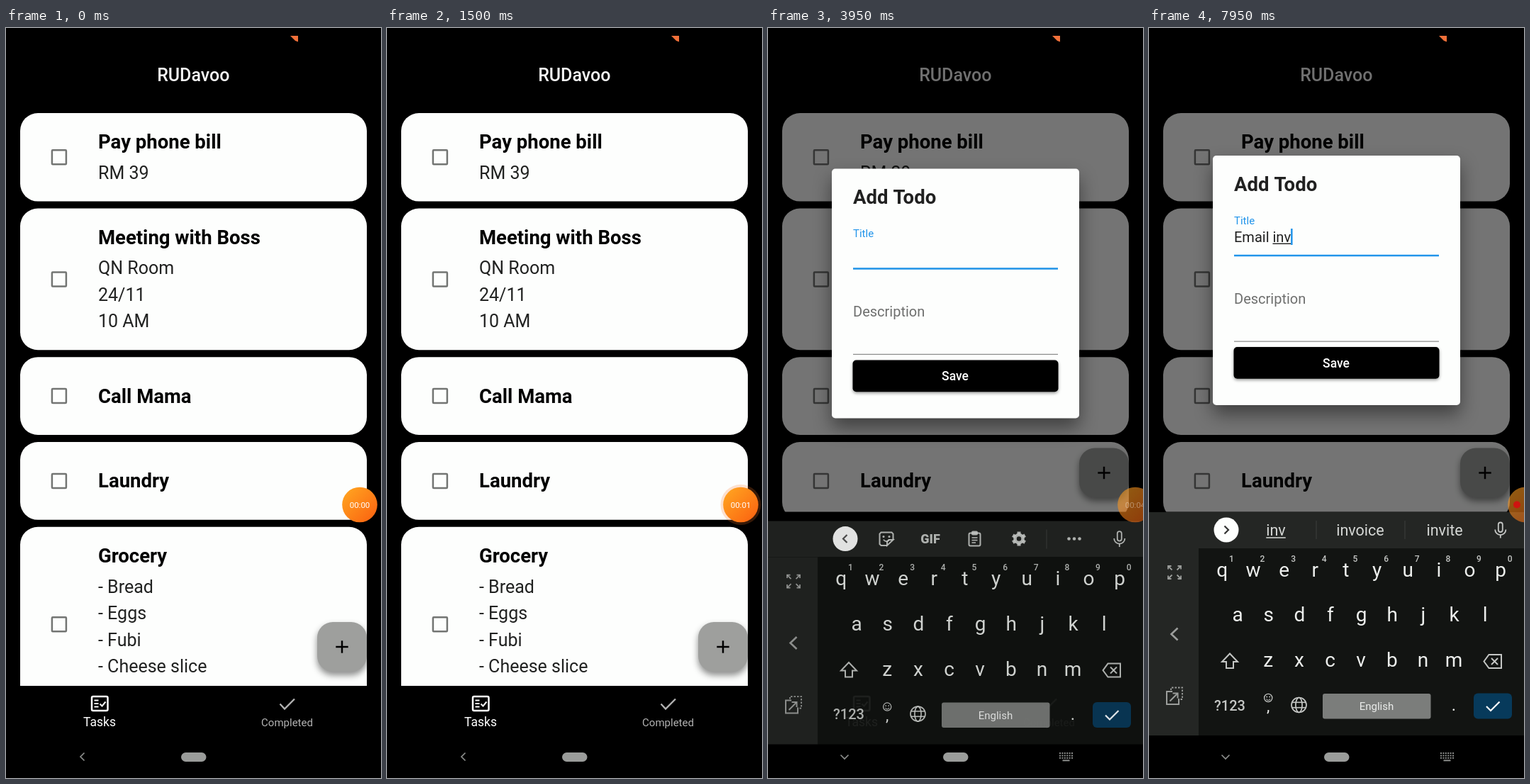
Animation, 529 px wide and 1058 px high, one loop 8 s. Source, as an HTML page with a canvas:

```html
<!DOCTYPE html>
<html lang="en">
<head>
<meta charset="utf-8">
<title>Todo app</title>
<style>
html, body { margin: 0; width: 100%; height: 100%; overflow: hidden; background: #000; }
canvas { display: block; width: 529px; height: 1058px; }
</style>
</head>
<body>
<canvas id="stage"></canvas>
<script>
const W = 529, H = 1058, LOOP = 8000;
const canvas = document.getElementById('stage');
const c = canvas.getContext('2d');
const dpr = window.devicePixelRatio || 1;
canvas.width = W * dpr;
canvas.height = H * dpr;

const BLUE = '#2194ea', PAPER = '#fdfefd', ICON = '#c4c6c4';

const cards = [
  { title: 'Pay phone bill', lines: ['RM 39'] },
  { title: 'Meeting with Boss', lines: ['QN Room', '24/11', '10 AM'] },
  { title: 'Call Mama', lines: [] },
  { title: 'Laundry', lines: [] },
  { title: 'Grocery', lines: ['- Bread', '- Eggs', '- Fubi', '- Cheese slice', '- Trash bag'] },
  { title: 'Watch Elm Verdo', lines: ['Stop at Episode 983'] }
];

// time, finished text, word being composed, suggestions
const typing = [
  [4850, '', 'E', ['Email', 'Even']],
  [5050, '', 'Em', ['Email', 'Empty']],
  [5250, '', 'Ema', ['Email', 'Emails']],
  [5450, '', 'Emai', ['Email', null]],
  [5700, '', 'Email', ['Emails', null]],
  [6050, 'Email ', '', ['to', 'from']],
  [6600, 'Email ', 'i', ['in', 'is']],
  [6950, 'Email ', 'in', ['into', 'info']],
  [7450, 'Email ', 'inv', ['invoice', 'invite']]
];

const span = (t, start, time) => Math.min(1, Math.max(0, (t - start) / time));
const easeOut = (u, p = 3) => 1 - Math.pow(1 - u, p);

function text(s, x, y, size, color, weight = 400, align = 'left') {
  c.font = `${weight} ${size}px Roboto, "Noto Sans", sans-serif`;
  c.textAlign = align;
  c.fillStyle = color;
  c.fillText(s, x, y);
  return c.measureText(s).width;
}

const mid = (s, x, y, size, color, weight) => text(s, x, y, size, color, weight, 'center');

function rect(x, y, w, h, color, r = 0) {
  c.fillStyle = color;
  c.beginPath();
  c.roundRect(x, y, w, h, r);
  c.fill();
}

function frame(x, y, w, h, color, lw, r = 0) {
  c.strokeStyle = color;
  c.lineWidth = lw;
  c.beginPath();
  c.roundRect(x, y, w, h, r);
  c.stroke();
}

function line(pts, color, lw, close) {
  c.strokeStyle = color;
  c.lineWidth = lw;
  c.beginPath();
  for (let i = 0; i < pts.length; i += 2) c.lineTo(pts[i], pts[i + 1]);
  if (close) c.closePath();
  c.stroke();
}

function poly(pts, color) {
  c.fillStyle = color;
  c.beginPath();
  for (let i = 0; i < pts.length; i += 2) c.lineTo(pts[i], pts[i + 1]);
  c.fill();
}

function disc(x, y, r, color) {
  c.fillStyle = color;
  c.beginPath();
  c.arc(x, y, r, 0, 7);
  c.fill();
}

function arc(x, y, r, a, b, color, lw) {
  c.strokeStyle = color;
  c.lineWidth = lw;
  c.beginPath();
  c.arc(x, y, r, a * Math.PI, b * Math.PI);
  c.stroke();
}

function shadow(color, blur, dy) {
  c.shadowColor = color;
  c.shadowBlur = blur * dpr;
  c.shadowOffsetY = dy * dpr;
}

const noShadow = () => shadow('transparent', 0, 0);

function clip(x, y, w, h, draw) {
  c.save();
  c.beginPath();
  c.rect(x, y, w, h);
  c.clip();
  draw();
  c.restore();
}

function scrollAt(t) {
  return t < 800 ? 220 * easeOut(span(t, 30, 400)) : 220 * (1 - easeOut(span(t, 800, 500)));
}

function drawList(scroll) {
  let y = 120 - scroll;
  for (const { title, lines } of cards) {
    const n = lines.length;
    const h = n ? 87 + n * 37.55 : 109.8;
    rect(20, y, 489, h, PAPER, 25);
    frame(64.9, y + h / 2 - 10, 20, 20, '#737573', 2.5, 1);
    text(title, 130, y + (n ? 50 : 64.3), 27.5, '#000', 700);
    lines.forEach((s, i) => text(s, 130, y + 92.8 + i * 37.5, 25, '#212221'));
    y += h + 10;
  }
  if (scroll > 0.5) {
    const g = c.createLinearGradient(0, 100, 0, 107);
    g.addColorStop(0, 'rgba(0,0,0,.3)');
    g.addColorStop(1, 'rgba(0,0,0,0)');
    c.fillStyle = g;
    c.fillRect(0, 100, W, 7);
  }
}

function drawFab(t, y) {
  shadow('rgba(0,0,0,.45)', 10, 5);
  rect(439, y, 70, 70, '#9e9f9d', 22);
  noShadow();
  const u = span(t, 2180, 350);
  if (u > 0 && u < 1) {
    c.save();
    c.beginPath();
    c.roundRect(439, y, 70, 70, 22);
    c.clip();
    disc(474, y + 35, 8 + 42 * u, `rgba(255,255,255,${0.16 * (1 - u)})`);
    c.restore();
  }
  line([465.3, y + 35, 482.7, y + 35], '#000', 2.5);
  line([474, y + 26.3, 474, y + 43.7], '#000', 2.5);
}

function drawTabs() {
  rect(0, 928, W, 130, '#000');
  frame(121, 943, 22.5, 20, '#fff', 2.5, 2);
  for (const y of [948.5, 953, 957.5]) line([124.5, y, 130.5, y], '#fff', 2);
  line([132.5, 953.5, 135.5, 956.5, 140.5, 950.5], '#fff', 2);
  mid('Tasks', 132, 985, 17.5, '#fff');
  line([386.5, 953.5, 393, 960.5, 407, 946.5], '#b3b3b3', 2.3);
  mid('Completed', 396.5, 985, 15, '#b3b3b3');
}

function drawDialog(t, entry) {
  const y = 344 - 164 * easeOut(span(t, 3845, 205));
  const focus = easeOut(span(t, 3550, 200), 2);
  shadow('rgba(0,0,0,.45)', 26, 13);
  rect(90, y, 349, 352, PAPER, 5);
  noShadow();
  text('Add Todo', 120, y + 50, 27.5, '#212121', 700);
  text('Title', 120, y + 119 - 22 * focus, 20 - 5 * focus, focus > 0 ? BLUE : '#6e6f6e');
  line([120, y + 141, 409, y + 141], '#8c8d8c', 1.25);
  if (focus > 0) {
    const half = 144.5 * focus;
    line([264.5 - half, y + 141, 264.5 + half, y + 141], BLUE, 2.5);
  }
  let x = 120;
  if (entry) {
    x += text(entry[1], x, y + 121.5, 20, '#1f1f1f');
    const w = text(entry[2], x, y + 121.5, 20, '#1f1f1f');
    if (w) line([x, y + 124.3, x + w, y + 124.3], '#1f1f1f', 1.4);
    x += w;
  }
  if (entry || (t >= 4100 && t < 4600)) rect(x, y + 103, 2.5, 23, BLUE);
  text('Description', 120, y + 209, 20, '#6e6f6e');
  line([120, y + 262, 409, y + 262], '#8c8d8c', 1.25);
  shadow('rgba(0,0,0,.4)', 4, 2);
  rect(119.5, y + 270, 290, 44.7, '#000', 5);
  noShadow();
  mid('Save', 264, y + 298.7, 17.5, '#fff', 500);
}

function drawMic() {
  frame(492.8, 697.5, 6, 13.5, ICON, 1.8, 3);
  arc(495.8, 707.5, 7.6, 0, 1, ICON, 1.8);
  line([495.8, 715, 495.8, 719.5], ICON, 1.8);
}

function drawToolbar() {
  line([111.5, 702.5, 106, 708, 111.5, 713.5], '#333', 2.2);
  // sticker
  line([168, 717.5, 159.5, 717.5, 157.5, 715.5, 157.5, 701, 159.5, 699, 174.5, 699, 176.5, 701, 176.5, 709.5], ICON, 2);
  line([176.5, 709.5, 168, 717.5, 168, 712, 170.5, 709.5], ICON, 2, true);
  disc(163, 705, 1.5, ICON);
  disc(171, 705, 1.5, ICON);
  arc(167, 707, 4.5, 0.15, 0.85, ICON, 1.8);
  mid('GIF', 229, 714.5, 18, ICON, 900);
  // clipboard
  frame(283.5, 700, 16, 18, ICON, 2, 2);
  rect(287, 697, 9, 6, ICON, 2);
  for (const [y, w] of [[706.5, 8], [710, 8], [713.5, 5.5]]) line([287.5, y, 287.5 + w, y], ICON, 1.6);
  // gear
  arc(354, 708, 5.5, 0, 2, ICON, 4.5);
  for (let i = 0; i < 6; i++) {
    const a = i * Math.PI / 3 + Math.PI / 6, dx = Math.cos(a), dy = Math.sin(a);
    line([354 + 6 * dx, 708 + 6 * dy, 354 + 10 * dx, 708 + 10 * dy], ICON, 5);
  }
  line([393, 695, 393, 722], '#3d3f3d', 1);
  for (const x of [424.5, 432, 439.5]) disc(x, 708, 2.3, ICON);
}

function drawEnvelopes() {
  rect(379, 700, 23, 17, '#fbc02d', 1.5);
  line([379.5, 716, 388, 708.5], '#e09a1a', 1);
  line([401.5, 716, 393, 708.5], '#e09a1a', 1);
  line([379.5, 701, 390.5, 710, 401.5, 701], '#c98a16', 1.4);
  poly([440, 702, 458, 702, 454, 716, 436, 716], '#fbb52d');
  line([440.5, 702.5, 447.5, 709.5, 457.5, 702.5], '#c07f16', 1.3);
  line([434.5, 704, 441, 704], '#3a8fe0', 1.8);
  line([434, 708.5, 439, 708.5], '#3a8fe0', 1.8);
  line([433, 713, 437, 713], '#3a8fe0', 1.8);
}

function drawSuggestions([, , word, [next, other]]) {
  const ink = '#d6d8d6';
  line([106.5, 702.5, 112, 708, 106.5, 713.5], '#333', 2.2);
  const w = mid(word, 179, 716, 21.5, ink);
  if (word) line([179 - w / 2, 719, 179 + w / 2, 719], ink, 1.5);
  mid(next, 298, 716, 21.5, ink);
  const bars = other ? [236, 361] : [236, 361, 418];
  for (const x of bars) line([x, 695, x, 721], '#3d3f3d', 1);
  if (other) mid(other, 417, 716, 21.5, ink);
  else drawEnvelopes();
}

function drawSidePanel() {
  for (const sx of [-1, 1]) for (const sy of [-1, 1]) {
    const p = (a, b) => [36 + sx * a, 768 + sy * b];
    line([...p(3.5, 3.5), ...p(9, 9)], '#9b9d9b', 1.8);
    line([...p(4.5, 9), ...p(9, 9), ...p(9, 4.5)], '#9b9d9b', 1.8);
  }
  line([40.5, 846.5, 31.5, 855, 40.5, 863.5], '#9b9d9b', 2.6);
  c.setLineDash([2.5, 2]);
  line([31, 934, 31, 930.5, 47, 930.5, 47, 947, 43, 947], '#9b9d9b', 1.8);
  c.setLineDash([]);
  line([33, 936, 25, 936, 25, 954, 42, 954, 42, 946], '#9b9d9b', 2);
  line([29.5, 949.5, 40, 939], '#9b9d9b', 2);
  line([33.5, 938.5, 40.5, 938.5, 40.5, 945.5], '#9b9d9b', 2);
}

function drawKeys(upper) {
  const ink = '#eceeec';
  const rows = [['qwertyuiop', 103.3, 773.5], ['asdfghjkl', 125, 837], ['zxcvbnm', 168.2, 901]];
  rows.forEach(([keys, x0, y], r) => [...keys].forEach((k, i) => {
    const x = x0 + i * 43.65;
    mid(upper ? k.toUpperCase() : k, x, y, 28, ink);
    if (!r) mid(String((i + 1) % 10), x + 13, 752.5, 12, ICON, 500);
  }));
  const arrow = [114, 882.5, 125, 894, 119, 894, 119, 903, 109, 903, 109, 894, 103, 894];
  if (upper) poly(arrow, ink);
  line(arrow, ICON, 2, true);
  line([472.5, 893.5, 479.5, 884, 497, 884, 497, 903, 479.5, 903], ICON, 2, true);
  line([483, 889, 492, 898], ICON, 2);
  line([492, 889, 483, 898], ICON, 2);

  mid('?123', 114, 962.5, 20, ICON, 500);
  arc(168.2, 945, 5.6, 0, 2, ICON, 1.3);
  disc(166.2, 943.5, 0.9, ICON);
  disc(170.2, 943.5, 0.9, ICON);
  arc(168.2, 945.5, 2.8, 0.1, 0.9, ICON, 1.1);
  mid(',', 168.2, 964, 22, ink);
  arc(211.5, 955, 10.5, 0, 2, ICON, 1.7);
  c.beginPath();
  c.ellipse(211.5, 955, 4.6, 10.5, 0, 0, 7);
  c.stroke();
  line([202, 951.3, 221, 951.3], ICON, 1.6);
  line([202, 958.7, 221, 958.7], ICON, 1.6);
  rect(245, 939, 152.5, 35.5, '#7b7d7b', 3);
  mid('English', 321, 962.3, 15, '#eaecea');
  mid('.', 430, 963, 24, ink);
  rect(458, 938.5, 54, 36, '#073a5b', 6);
  line([476, 957, 482, 963, 494.5, 950.5], '#fff', 2.2);
}

function drawKeyboard(t, entry) {
  const u = span(t, 3800, 250);
  if (!u) return;
  clip(0, 600, W, 411, () => {
    c.translate(0, 80 * Math.pow(1 - u, 2));
    c.globalAlpha = Math.min(1, u * 1.45);
    rect(0, 683, W, 51, '#242624');
    rect(0, 734, 70.5, 264, '#242624');
    rect(70.5, 734, W - 70.5, 264, '#121412');
    disc(109, 708, 17.5, PAPER);
    if (entry) drawSuggestions(entry);
    else drawToolbar();
    drawMic();
    drawSidePanel();
    drawKeys(t >= 4550 && t < 4850);
  });
}

function drawSystem(t) {
  const x = t < 5000 ? 401 : 409;
  poly([x, 11, x + 11, 11, x + 11, 19.5, x + 7, 18], '#f0703a');
  rect(247, 1022, 35.5, 13, '#9a9c9a', 6.5);
  const grey = '#8b8d8b';
  if (t < 3845) {
    line([110.5, 1022.5, 105, 1028, 110.5, 1033.5], grey, 1.7);
    return;
  }
  line([102.5, 1025.5, 108, 1031, 113.5, 1025.5], grey, 1.7);
  for (let r = 0; r < 3; r++)
    for (let i = 0; i < 6; i++) rect(411 + i * 3.4, 1022 + r * 3.4, 2, 2, grey);
  rect(415.5, 1032.3, 10, 2, grey);
}

function drawBubble(t) {
  const aside = easeOut(span(t, 1900, 200));
  const x = 499 + 19 * aside + 13 * easeOut(span(t, 5000, 150));
  const y = 672.5;
  c.save();
  c.globalAlpha = 1 - 0.43 * aside;
  disc(x, y, 28.5, `rgba(250,120,40,${0.22 * span(t, 0, 200) * (1 - aside)})`);
  const g = c.createLinearGradient(x - 18, y - 18, x + 18, y + 18);
  g.addColorStop(0, '#ff9f1f');
  g.addColorStop(1, '#fb6912');
  disc(x, y, 24.8, g);
  if (t < 5000) mid('00:0' + Math.floor((t + 100) / 1000), x, y + 4.5, 11.5, `rgba(255,255,255,${1 - 0.35 * aside})`);
  c.restore();
  if (t >= 5000) disc(x - 12, y, 5, '#cf1410');
}

function draw(now) {
  const t = now % LOOP;
  const entry = typing.filter(e => t >= e[0]).pop();
  const bottom = t < 3845 ? 928 : 682.5;
  c.setTransform(dpr, 0, 0, dpr, 0, 0);
  c.lineCap = 'butt';
  c.lineJoin = 'miter';
  rect(0, 0, W, H, '#000');
  mid('RUDavoo', 264.3, 74.5, 25, '#f6f6f6', 500);
  clip(0, 100, W, bottom - 100, () => drawList(scrollAt(t)));
  drawTabs();
  drawFab(t, bottom - 90);
  const open = span(t, 2380, 170);
  if (open) {
    rect(0, 0, W, H, `rgba(0,0,0,${0.54 * open})`);
    c.globalAlpha = open;
    drawDialog(t, entry);
    c.globalAlpha = 1;
  }
  drawKeyboard(t, entry);
  drawSystem(t);
  drawBubble(t);
  requestAnimationFrame(draw);
}

requestAnimationFrame(draw);
</script>
</body>
</html>
```
